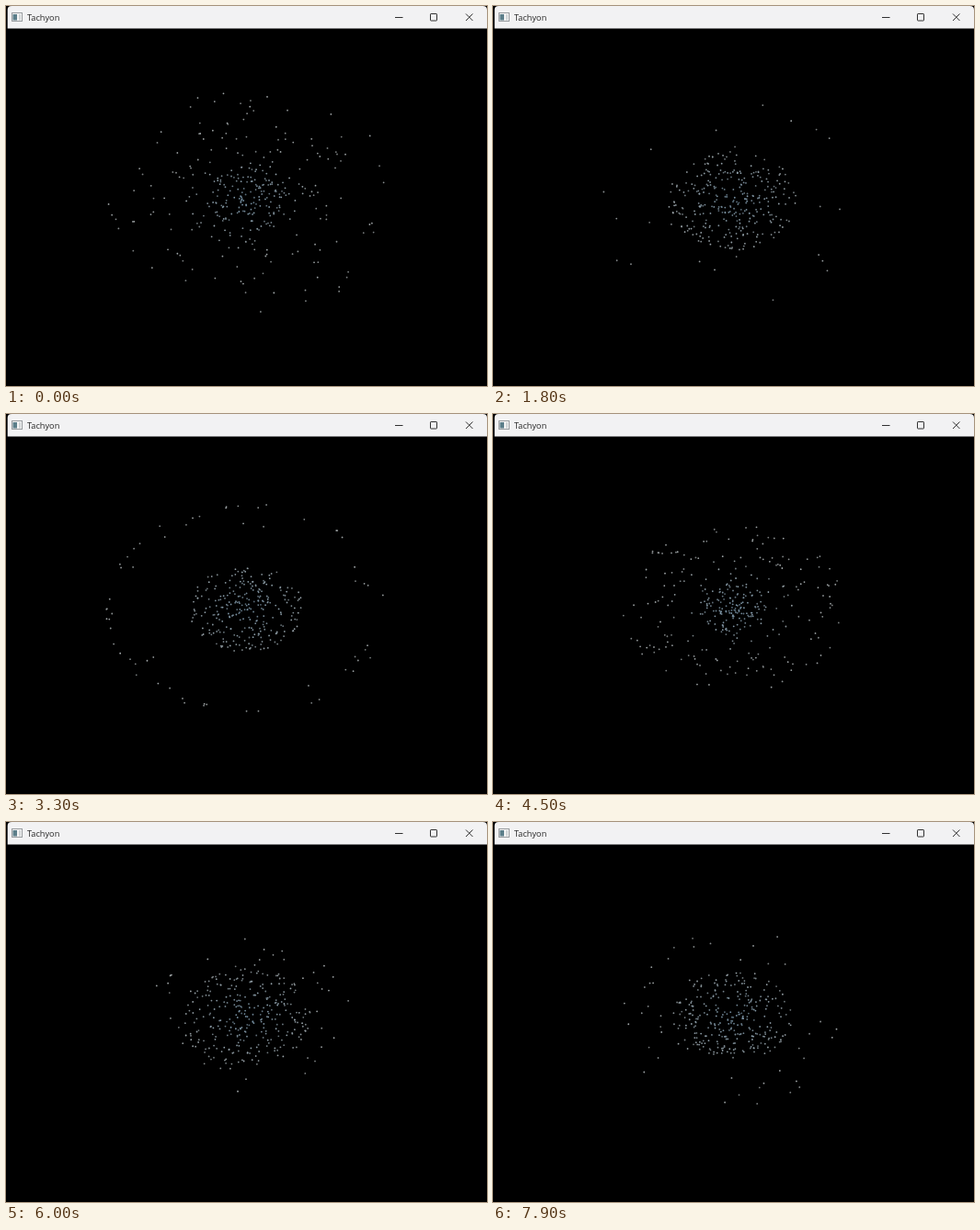
These frames come from a looping animation (523x414 px, 8000 ms). An HTML page with a canvas:

```html
<!DOCTYPE html>
<html lang="en">
<head>
<meta charset="utf-8">
<title>Tachyon</title>
<style>
  html, body { margin: 0; width: 523px; height: 414px; overflow: hidden; background: #000; }
  canvas, svg { position: absolute; left: 0; top: 0; display: block; }
  text { font: 9.2px "Open Sans", "Noto Sans", sans-serif; fill: #242424; }
</style>
</head>
<body>
<canvas id="space" width="523" height="414"></canvas>
<svg width="523" height="25" viewBox="0 0 523 25">
  <path d="M1.700 24.400V4Q1.700 0 6 0H518.500Q523 0 523 4V24.400Z" fill="#f2f2f3"/>
  <rect x="6.500" y="7.500" width="11" height="9" fill="#f4f4f4" stroke="#989c9f"/>
  <rect x="7.500" y="9" width="4.500" height="6.500" fill="#5c7f8a"/>
  <rect x="14" y="9" width="2" height="6.500" fill="#cfd4d6"/>
  <text x="23" y="15.700">Tachyon</text>
  <g fill="none" stroke="#303030">
    <path d="M423 12.500H431.500"/>
    <rect x="461.500" y="8.500" width="7" height="7.500" rx=".6"/>
    <path d="M500 8.500L507.500 16M507.500 8.500L500 16"/>
  </g>
</svg>
<script>
const LOOP = 8000, STEP = 100, COUNT = 330;
const CENTRE_X = 261, CENTRE_Y = 212, FLATTEN = .76;
const ctx = document.getElementById('space').getContext('2d');

// share: part of the swarm in the halo; curve: below 1 gathers the halo into a ring
const phases = [
  {at: 0, core: 46, halo: 165, share: .52, curve: 1.25},
  {at: 1800, core: 71, halo: 156, share: .06, curve: 1},
  {at: 3300, core: 62, halo: 153, share: .18, curve: .14},
  {at: 4500, core: 38, halo: 121, share: .56, curve: .8},
  {at: 6000, core: 71, halo: 115, share: .11, curve: 1},
  {at: 6900, core: 63, halo: 122, share: .17, curve: 1},
  {at: 7900, core: 65, halo: 128, share: .15, curve: 1}
];

let seed = 7321;
function rand() {
  seed = (seed * 1664525 + 1013904223) % 4294967296;
  return seed / 4294967296;
}

const dots = Array.from({length: COUNT}, () => ({
  angle: rand() * Math.PI * 2,
  offset: rand(),
  period: 3800 + rand() * 2200,
  turn: (rand() - .5) * .00016,
  glow: .7 + rand() * .3
}));

const mix = (a, b, k) => a + (b - a) * k;

function swarmAt(t) {
  const next = Math.max(1, phases.findIndex(p => p.at > t));
  const a = phases[next - 1], b = phases[next];
  const p = (t - a.at) / (b.at - a.at);
  const k = p * p * (3 - 2 * p);
  const at = name => mix(a[name], b[name], k);
  return {core: at('core'), halo: at('halo'), share: at('share'), curve: at('curve')};
}

// Spread ranks 0..1 over an even core and a thinner halo
function radiusAt(rank, {core, halo, share, curve}) {
  const edge = 1 - share;
  if (rank < edge) return core * (rank / edge) ** .58;
  return mix(core, halo, ((rank - edge) / share) ** curve);
}

function drawDot(x, y, radius, glow) {
  const k = Math.min(1, radius / 80);
  const [r, g, b] = [mix(118, 164, k), mix(146, 170, k), mix(166, 172, k)];
  ctx.fillStyle = `rgba(${r},${g},${b},${glow})`;
  ctx.beginPath();
  ctx.arc(x, y, .9, 0, Math.PI * 2);
  ctx.fill();
}

function draw(t) {
  const swarm = swarmAt(Math.min(t, phases[phases.length - 1].at - 1));
  ctx.fillStyle = '#000';
  ctx.fillRect(0, 0, 523, 414);
  for (const d of dots) {
    // Swing through the centre and out on the other side
    const swing = 4 * Math.abs((d.offset + t / d.period) % 1 - .5) - 1;
    const radius = radiusAt(Math.abs(swing), swarm);
    const reach = Math.sign(swing) * radius;
    const angle = d.angle + d.turn * t;
    const x = CENTRE_X + reach * Math.cos(angle);
    const y = CENTRE_Y + reach * Math.sin(angle) * FLATTEN;
    drawDot(x, y, radius, d.glow);
  }
}

const start = performance.now();
function tick() {
  const t = (performance.now() - start) % LOOP;
  draw(Math.floor(t / STEP) * STEP);
  requestAnimationFrame(tick);
}
tick();
</script>
</body>
</html>
```
